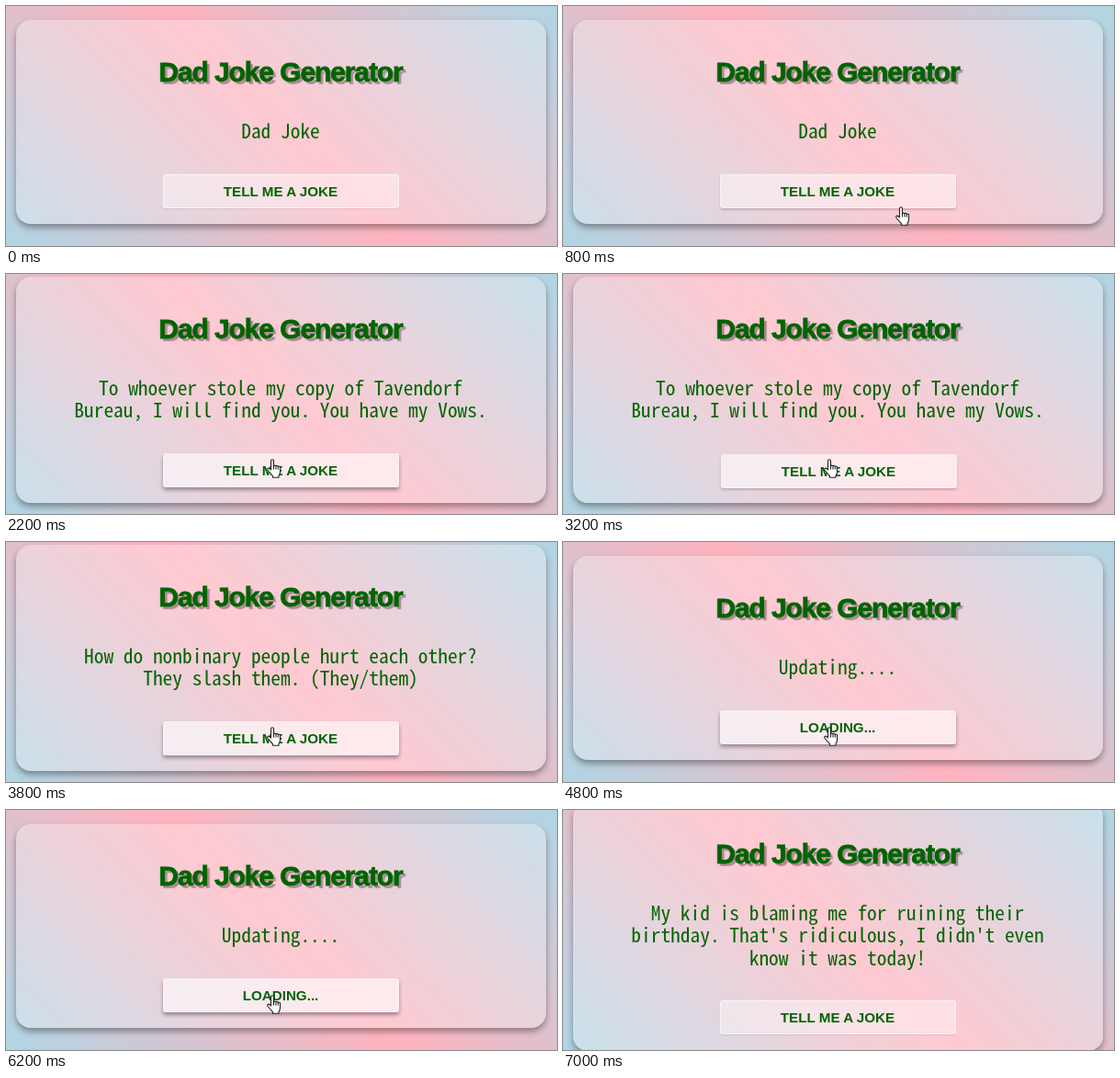
Recreate the animation shown at these times as an HTML page. Size 600 px wide and 261 px high, loop 7.7 s.

```html
<!DOCTYPE html>
<html lang="en">
<head>
<meta charset="utf-8">
<title>Dad Joke Generator</title>
<style>
  html, body { margin: 0; width: 100%; height: 100%; overflow: hidden; }
  #stage {
    position: relative; width: 600px; height: 261px; overflow: hidden;
    background: linear-gradient(45deg, #b0d5e4, #ffb3be, #b0d5e4);
    color: #006400; text-align: center;
  }
  #card, #title, #joke, #button, #cursor { position: absolute; box-sizing: border-box; }
  #card {
    left: 10.5px; width: 577px; border-radius: 16px;
    background: rgba(255, 255, 255, .29);
    box-shadow: 0 4px 7px rgba(0, 0, 0, .36);
  }
  #title {
    left: 0; right: 0; top: 42px; margin: 0;
    font: bold 30px/30px "Liberation Sans", Arial, sans-serif;
    letter-spacing: -1.1px;
    -webkit-text-stroke: .8px #006400;
    text-shadow: 3px 3px 1px rgba(70, 40, 60, .42);
  }
  #joke {
    left: 0; right: 0; top: 108px; white-space: pre;
    font: 300 21.4px/24.5px "Noto Sans Mono CJK JP", "Noto Sans Mono CJK SC", "Noto Sans Mono", "DejaVu Sans Mono", monospace;
    letter-spacing: calc(10.7px - 1ch);
  }
  #button {
    left: 160px; bottom: 17.5px; width: 257px; height: 37px;
    border: 1px solid; border-radius: 3px;
    font: bold 15.2px/35px "Liberation Sans", Arial, sans-serif;
  }
  #cursor { left: 0; top: 0; overflow: visible; }
</style>
</head>
<body>
<div id="stage">
  <div id="card">
    <h1 id="title">Dad Joke Generator</h1>
    <div id="joke"></div>
    <div id="button"></div>
  </div>
  <svg id="cursor" width="17" height="22" fill="#fff" stroke="#222" stroke-width="1.1" stroke-linejoin="round">
    <g id="hand">
      <path d="M5 12V2.2a1.5 1.5 0 0 1 3 0V8a1.3 1.3 0 0 1 2.5.3 1.2 1.2 0 0 1 2.3.7 1.1 1.1 0 0 1 2.2.8v4.5q0 2.5-1.5 4v2H7v-1.6L2 13q-1.6-2.2 0-2.8 1.3-.3 3 1.8z"/>
      <path d="M8 8v3.5M10.5 8.5v3M12.8 9.2v2.4" fill="none"/>
    </g>
    <path id="arrow" d="M6.5.7v15l3.5-3.2 2.4 5.5 2.2-1-2.4-5.3h4.8z"/>
  </svg>
</div>
<script>
  const LOOP = 7700, STEP = 100, LINE = 24.5;
  const WAIT = 'Updating....';
  const texts = [
    [0, 'Dad Joke'],
    [1400, WAIT],
    [2200, 'To whoever stole my copy of Tavendorf\nBureau, I will find you. You have my Vows.'],
    [3300, WAIT],
    [3800, 'How do nonbinary people hurt each other?\nThey slash them. (They/them)'],
    [4700, WAIT],
    [5300, 'What do you call a fake noodle? Impasta.'],
    [6100, WAIT],
    [6600, "My kid is blaming me for ruining their\nbirthday. That's ridiculous, I didn't even\nknow it was today!"]
  ];
  const presses = [1300, 3200, 4600, 6000];
  // time, x, y of the pointer tip
  const path = [[500, 425, 252], [800, 368, 218], [1100, 290, 201], [6600, 290, 201], [7000, 318, 262]];

  const $ = id => document.getElementById(id);
  const [card, joke, button, cursor, hand, arrow] =
    ['card', 'joke', 'button', 'cursor', 'hand', 'arrow'].map($);
  const ramp = (t, a, b) => Math.min(1, Math.max(0, (t - a) / (b - a)));
  const show = (el, on) => { el.style.display = on ? '' : 'none'; };

  function pointerAt(t) {
    const i = path.findIndex(p => p[0] > t);
    if (i < 1) return null;
    const [a, b] = [path[i - 1], path[i]];
    const k = ramp(t, a[0], b[0]);
    return [a[1] + (b[1] - a[1]) * k, a[2] + (b[2] - a[2]) * k];
  }

  function drawButton(hover, pressed) {
    const lift = pressed ? .4 : hover;
    Object.assign(button.style, {
      background: `rgba(255,255,255,${.42 + .17 * hover})`,
      borderColor: `rgba(255,255,255,${.6 - .35 * hover})`,
      boxShadow: `0 ${1 + 2 * lift}px ${1 + 3 * lift}px rgba(60,40,60,${.12 + .33 * lift})`,
      transform: pressed ? 'translate(1px, 1px)' : 'none'
    });
  }

  function render(time) {
    const t = Math.floor(time / STEP) * STEP;
    const text = texts.filter(s => s[0] <= t).pop()[1];
    const extra = text.split('\n').length - 1;
    card.style.top = 15 - extra * LINE / 2 + 'px';
    card.style.height = 222 + extra * LINE + 'px';
    joke.textContent = text;
    button.textContent = text === WAIT ? 'LOADING...' : 'TELL ME A JOKE';

    const hover = ramp(t, 700, 1000) * (1 - ramp(t, 6500, 6800));
    drawButton(hover, presses.includes(t));

    const tip = pointerAt(t);
    show(cursor, tip);
    if (tip) {
      const over = t >= 800 && t < 6600;
      show(hand, over);
      show(arrow, !over);
      cursor.style.transform = `translate(${tip[0] - 6.5}px, ${tip[1]}px)`;
    }
  }

  const start = performance.now();
  function tick() {
    render((performance.now() - start) % LOOP);
    requestAnimationFrame(tick);
  }
  tick();
</script>
</body>
</html>
```
